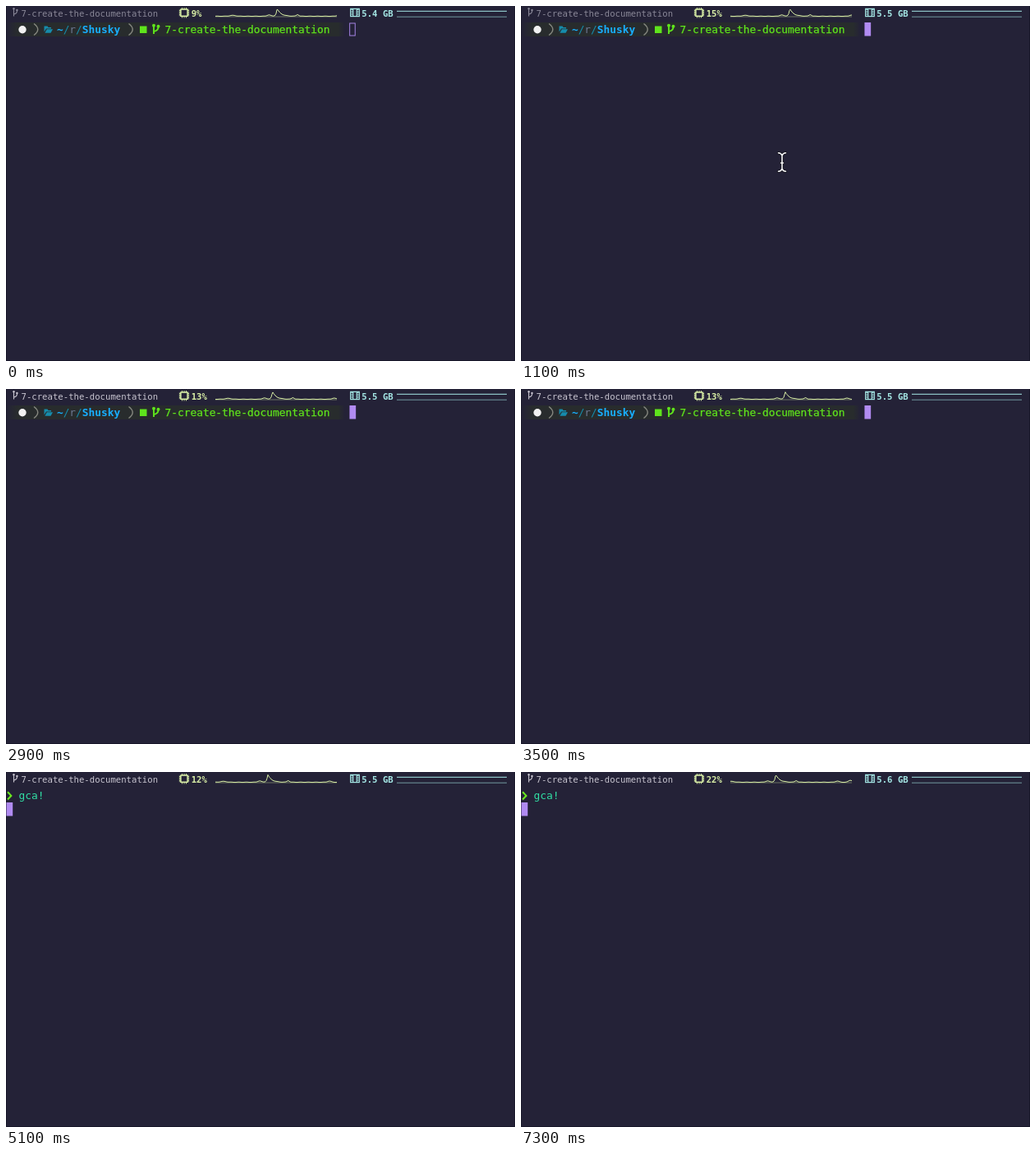
Recreate the animation shown at these times as an HTML page. Size 620x432 px, loop 8000 ms.

```html
<!DOCTYPE html>
<html lang="en">
<head>
<meta charset="utf-8">
<title>Terminal session</title>
<style>
  html, body { margin: 0; width: 100%; height: 100%; overflow: hidden; background: #242237; }
  svg { display: block; width: 620px; height: 432px; }
  text { font-family: "DejaVu Sans Mono", "Liberation Mono", monospace; white-space: pre; }
  .line { font-size: 12.85px; }
  .bar { font-size: 10.65px; }
  .bold { font-weight: bold; }
  .stroke { fill: none; }
  .green { fill: #5fe51c; }
  .heavy { stroke: #5fe51c; stroke-width: .25px; }
</style>
</head>
<body>
<svg viewBox="0 0 620 432">
  <defs>
    <linearGradient id="segment">
      <stop offset="0" stop-color="#282c2d" stop-opacity="0"/>
      <stop offset=".035" stop-color="#282c2d"/>
      <stop offset=".98" stop-color="#282c2d"/>
      <stop offset="1" stop-color="#282c2d" stop-opacity="0"/>
    </linearGradient>
    <path id="beam" d="M-4.5-11.3Q-1-11 0-8Q1-11 4.5-11.3M0-8V8M-4.5 11.3Q-1 11 0 8Q1 11 4.5 11.3M-1.5 1H1.5"/>
  </defs>
  <rect width="620" height="432" fill="#242237"/>
  <path class="stroke" d="M.5 0V431.5H619.5V0" stroke="#171629"/>

  <g id="label">
    <path class="stroke" d="M9.5 3.5V12.5M9.5 10Q13.5 9.5 13.5 5.5" stroke="currentColor" stroke-width="1.1"/>
    <circle cx="9.5" cy="3.3" r="1.2" fill="currentColor"/>
    <circle cx="13.4" cy="5" r="1.2" fill="currentColor"/>
    <text class="bar" x="18.5" y="12.5" fill="currentColor">7-create-the-documentation</text>
  </g>

  <g color="#d9efa6">
    <path d="M210.8 8.2H223.2" stroke="currentColor" stroke-width="8" stroke-dasharray="1.2 10 1.2" opacity=".45"/>
    <path class="stroke" d="M214.5 2V14.4M217 2V14.4M219.5 2V14.4M211 5.7H223M211 8.2H223M211 10.7H223" stroke="currentColor"/>
    <rect x="212.9" y="4.1" width="8.2" height="8.2" fill="#242237" stroke="currentColor" stroke-width="1.5"/>
    <text id="cpu" class="bar bold" x="225.7" y="12.5" fill="currentColor"></text>
    <path d="M255 13H403" stroke="currentColor" stroke-width=".8" opacity=".5"/>
    <path id="graph" class="stroke" stroke="currentColor"/>
  </g>

  <g color="#a5e8e6">
    <rect class="stroke" x="419.7" y="3.4" width="10.6" height="9.2" stroke="currentColor" stroke-width="1.2"/>
    <path d="M422.8 3V13M427.2 3V13" stroke="currentColor" stroke-width="1.2"/>
    <path d="M421.2 4V12M428.8 4V12" stroke="currentColor" stroke-width="1.4" stroke-dasharray="1 1"/>
    <text id="memory" class="bar bold" x="433.3" y="12.5" fill="currentColor"></text>
    <path d="M476 6.3H610" stroke="currentColor"/>
    <path d="M476 13.2H610" stroke="currentColor" opacity=".6"/>
  </g>

  <g id="prompt">
    <rect x="0" y="20" width="413" height="17" fill="url(#segment)"/>
    <circle cx="20" cy="28.7" r="4.7" fill="#f1f1f1"/>
    <path class="stroke" d="M34 21.5Q43.5 28.5 34 35.5M149.5 21.5Q159 28.5 149.5 35.5" stroke="#85877f" stroke-width="1.4"/>
    <path d="M46.5 24.5H50.5L51.5 26H55V27.5H49L46.5 31.5ZM49.8 28.3H57L54.5 32.7H47.3Z" fill="#168cab"/>
    <text class="line" x="61.9" y="33"><tspan class="bold" fill="#18afff">~</tspan><tspan fill="#168cab">/</tspan><tspan fill="#6d7891">r</tspan><tspan fill="#168cab">/</tspan><tspan class="bold" fill="#18afff">Shusky</tspan></text>
    <rect class="green" x="163" y="24.5" width="8.5" height="8.5"/>
    <path class="stroke" d="M180 24V34M180 31Q185.5 30 185.5 25.5" stroke="#5fe51c" stroke-width="1.9"/>
    <circle class="green" cx="180" cy="23.8" r="2"/>
    <circle class="green" cx="185.5" cy="24.8" r="2"/>
    <text class="line green heavy" x="193.5" y="33">7-create-the-documentation</text>
  </g>
  <path id="arrow" class="stroke" d="M2 24.3L6.3 28.9L2 33.5" stroke="#6bea20" stroke-width="2.1"/>

  <text id="rest" class="line" y="33" fill="#6a6982"></text>
  <rect id="cursor"/>
  <text id="under" class="line bold" y="33" fill="#242237"></text>
  <text id="typed" class="line" y="33" fill="#31dfa5"></text>

  <g id="pointer" class="stroke" stroke-linecap="round">
    <use href="#beam" stroke="#15141f" stroke-width="3.4"/>
    <use href="#beam" stroke="#f4f4f6" stroke-width="1.6"/>
  </g>
</svg>
<script>
  const LOOP = 8000, CELL = 7.74, COMMAND = 'gca!';
  const FOCUS = 1000, BRIGHTEN = 1200, HIDE_POINTER = 2100, ENTER = 4900;
  const LOADS = [9, 15, 13, 13, 12, 12, 20, 22];

  const el = id => document.getElementById(id);
  const set = (id, attrs) => {
    for (const key in attrs) el(id).setAttribute(key, attrs[key]);
  };
  const show = (id, on) => set(id, { visibility: on ? 'visible' : 'hidden' });
  const write = (id, text, x) => {
    el(id).textContent = text;
    if (x !== undefined) set(id, { x });
  };

  // number of steps that have begun by time t
  const countSteps = (t, max, startOf) => {
    let n = 0;
    while (n < max && startOf(n) <= t) n++;
    return n;
  };
  // status refreshes come slightly faster over time
  const refreshAt = n => 1000 + 1115 * n - 16 * n * n;
  const keyAt = n => 3700 + 100 * n * n;

  const bump = (x, center, height, width) => height * Math.exp(-(((x - center) / width) ** 2));
  // load at x pixels from the peak: sharp rise, slow fall, a few small bumps
  const loadHeight = x =>
    9.4 * Math.exp(x < 0 ? x / 1.2 : -x / 4.5) +
    bump(x, -54, 1, 5) + bump(x, -10, 1.6, 3) + bump(x, 25, 1.9, 2) +
    bump(x, 75, 1.4, 3) + bump(x, 91, 2.4, 3) + .15 * Math.sin(x / 1.5);

  function drawStatus(t) {
    const n = countSteps(t, LOADS.length - 1, refreshAt);
    const peak = 330.2 - 2.85 * n;
    const points = [];
    for (let x = 255; x <= 403; x++) points.push(`${x} ${(12.4 - loadHeight(x - peak)).toFixed(2)}`);
    set('graph', { d: 'M' + points.join('L') });
    write('cpu', LOADS[n] + '%');
    write('memory', (n < 1 ? '5.4' : n < 6 ? '5.5' : '5.6') + ' GB');
    set('label', { color: t < BRIGHTEN ? '#8a8898' : '#c9c6d1' });
  }

  function drawCommand(t) {
    const entered = t >= ENTER;
    const count = countSteps(t, COMMAND.length, keyAt);
    const left = (entered ? 2 : 54) * CELL;
    const caret = entered ? 0 : left + count * CELL;
    const suggest = !entered && count > 0;
    show('prompt', !entered);
    show('arrow', entered);
    write('typed', COMMAND.slice(0, count), left);
    write('under', suggest ? COMMAND.slice(count, count + 1) : '', caret);
    write('rest', suggest ? COMMAND.slice(count + 1) : '', caret + CELL);
    set('cursor', t < FOCUS
      ? { x: caret + .7, y: 21, width: 6.6, height: 15, fill: 'none', stroke: '#a583e4' }
      : { x: caret + .5, y: entered ? 37 : 20, width: 7.7, height: 16.5, fill: '#b18bf2', stroke: 'none' });
  }

  function drawPointer(t) {
    const progress = Math.min(1, Math.max(0, (t - 100) / 950));
    const left = (1 - progress) ** 3;
    show('pointer', t >= 100 && t < HIDE_POINTER);
    set('pointer', { transform: `translate(${318 + 220 * left} ${190 + 216 * left})` });
  }

  function render(t) {
    drawStatus(t);
    drawCommand(t);
    drawPointer(t);
  }

  const start = performance.now();
  function tick() {
    render((performance.now() - start) % LOOP);
    requestAnimationFrame(tick);
  }
  tick();
</script>
</body>
</html>
```
